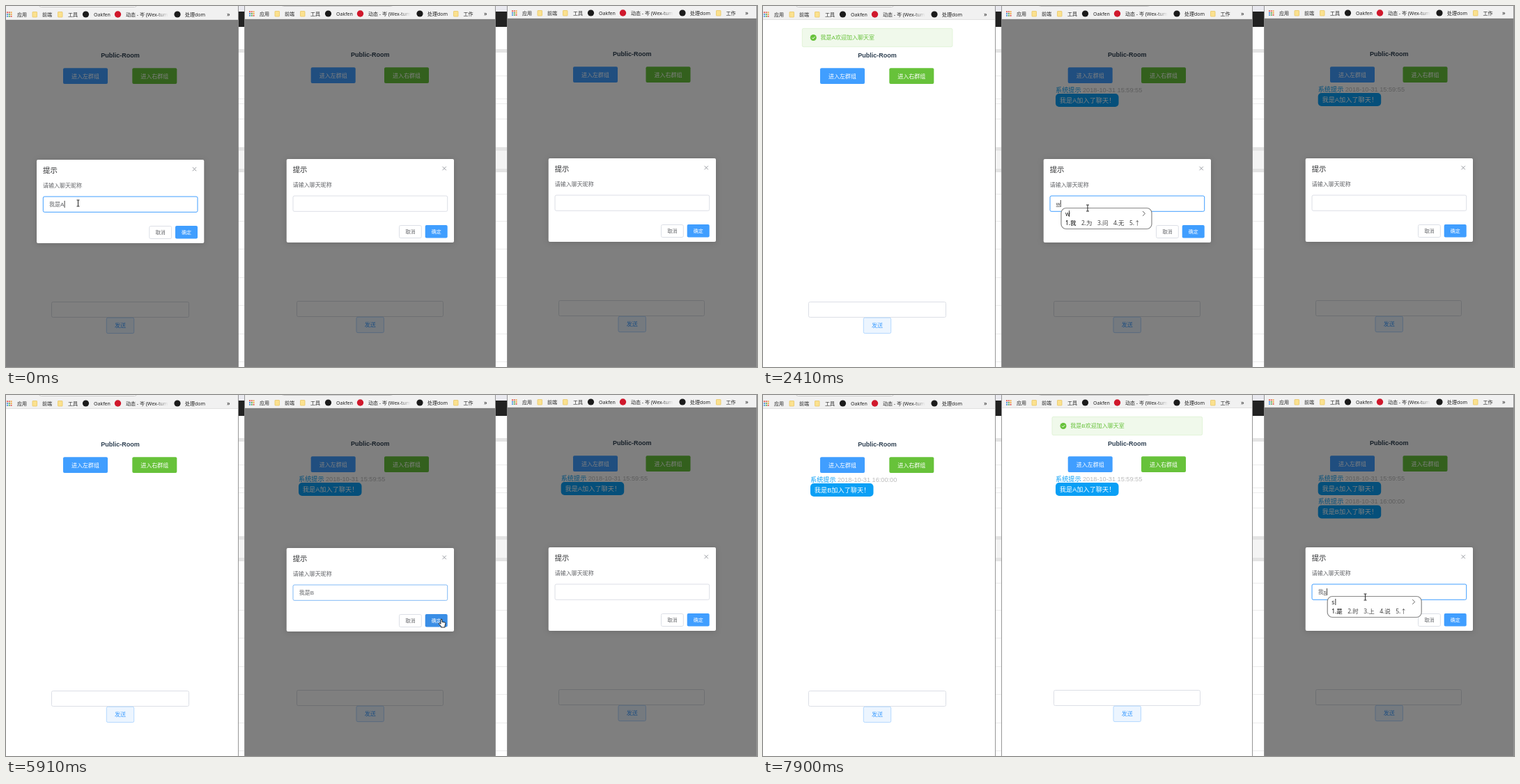
Write an HTML page that moves like this. It is 1078 px wide and 519 px high and loops after 8 s.

```html
<!DOCTYPE html>
<html lang="zh-CN">
<head>
<meta charset="utf-8">
<title>Group chat</title>
<style>
html, body { margin: 0; width: 100%; height: 100%; overflow: hidden; background: #fff; }
svg { display: block; width: 1078px; height: 519px; }
text { font-family: "Liberation Sans", "Noto Sans CJK SC", "Noto Sans CJK", sans-serif; white-space: pre; }
.bar text, .ime text { font-family: "Noto Sans", "Noto Sans CJK SC", "Noto Sans CJK", sans-serif; }
.box { filter: drop-shadow(0 1px 4px rgba(0, 0, 0, .15)); }
</style>
</head>
<body>
<svg id="stage" viewBox="0 0 1078 519" xmlns="http://www.w3.org/2000/svg"></svg>
<script>
const LOOP = 8000, BLUE = '#409eff', GREEN = '#67c23a', LINE = '#dcdfe6';
const stage = document.getElementById('stage');
const find = id => document.getElementById(id);

// Each window sits one pixel higher than the one before it.
const panels = [
  { x: 0, w: 333.5, cx: 164, buttons: [82, 181.3], send: [65.5, 197], msg: 68, bar: 0, more: 317, omni: 140,
    focus: [-500, 1180], caret: [[0, 370], [900, 1180]], close: 1236, toast: [1234, 3900], name: 'A' },
  { x: 342.5, w: 360, cx: 522.7, buttons: [437.7, 543], send: [417.5, 210], msg: 420, bar: 348, more: 686, omni: 160,
    focus: [1950, 5860], caret: [[1950, 5110], [5640, 5860]], close: 5911, toast: [5934, 1e5], name: 'B' },
  { x: 719.5, w: 358, cx: 898.7, buttons: [814, 918.5], send: [793.5, 209], msg: 796.7, bar: 725, more: 1061, omni: 0,
    focus: [6420, 1e5], caret: [[6420, 1e5]], close: 1e5, toast: [1e5, 2e5], name: 'C' }
];

const ONE = ['我', '为', '问', '无', '↑'], TWO = ['我是', '卧室', '我市', '我试', '↑'], SHI = ['是', '时', '上', '说', '↑'];
// [time, panel, committed text, composition, popup width, candidates]
const typing = [
  [0, 0, '我是A', '', 0],
  [0, 1, '', '', 0],
  [0, 2, '', '', 0],
  [2380, 1, '', 'w', 0],
  [2410, 1, '', 'w', 130, ONE],
  [2600, 1, '', 'ws', 159, TWO],
  [2800, 1, '', 'w', 130, ONE],
  [2960, 1, '', '', 0],
  [3250, 1, '', 'w', 130, ONE],
  [3360, 1, '', 'wi', 148, ONE],
  [3470, 1, '', '', 0],
  [3700, 1, '', 'w', 140, ONE, true],
  [3730, 1, '', 'w', 130, ONE],
  [3870, 1, '', 'wo', 130, ONE],
  [3960, 1, '', 'wos', 165, TWO],
  [4060, 1, '', 'wosh', 190, TWO],
  [4150, 1, '', 'woshi', 201, TWO],
  [4300, 1, '我是', '', 0],
  [4620, 1, '我是B', '', 0],
  [6960, 2, '', 'w', 130, ONE],
  [7370, 2, '', 'wo', 130, ONE],
  [7740, 2, '我', '', 0],
  [7900, 2, '我', 's', 135, SHI]
];

// [time, x, y] of the mouse
const mouse = [
  [0, 103.5, 283.5], [590, 103.5, 283.5], [1150, 258, 325], [1240, 260, 325], [1360, 287.5, 322.5],
  [1460, 287.5, 322.5], [2050, 466, 290.5], [5110, 466, 290.5], [5750, 618, 322], [5911, 625, 322],
  [6000, 807.5, 300], [6480, 864.5, 290.5], [LOOP, 864.5, 290.5]
];

const clamp = v => Math.max(0, Math.min(1, v));

// The standard CSS "ease" curve
function ease(p) {
  p = clamp(p);
  let lo = 0, hi = 1;
  for (let i = 0; i < 18; i++) {
    const u = (lo + hi) / 2, v = 1 - u;
    if (3 * v * v * u * .25 + 3 * v * u * u * .25 + u * u * u < p) lo = u; else hi = u;
  }
  return 3 * (1 - lo) ** 2 * lo * .1 + 3 * (1 - lo) * lo * lo + lo ** 3;
}

function mix(a, b, k) {
  return `rgb(${a.map((v, i) => Math.round(v + (b[i] - v) * k))})`;
}

const rect = (x, y, w, h, fill, extra = '') =>
  `<rect x="${x}" y="${y}" width="${w}" height="${h}" fill="${fill}" ${extra}/>`;
const text = (x, cy, size, fill, str, extra = '') =>
  `<text x="${x}" y="${cy + size * .37}" font-size="${size}" fill="${fill}" ${extra}>${str}</text>`;
const dot = (x, y, r, fill) => `<circle cx="${x}" cy="${y}" r="${r}" fill="${fill}"/>`;
const button = (x, y, w, h, size, fill, color, str, extra = '') =>
  rect(x, y, w, h, fill, `rx="2" ${extra}`) +
  text(x + w / 2, y + h / 2, size, color, str, 'text-anchor="middle" font-weight="500"');
const outline = color => `stroke="${color}"`;

function desktop() {
  const rows = [100, 133, 140, 162, 270, 309, 349, 390, 430, 471, 511];
  return rect(333, 0, 387, 519, '#fff') + rect(333, 0, 387, 8, '#e9e9ef') + rect(333, 8, 387, 22, '#222') +
    rect(333, 208, 387, 27, '#f4f4f4') +
    [62, 203, 234].map(y => rect(333, y, 387, 5, '#e4e4e4')).join('') +
    rows.map(y => rect(333, y, 387, 1, '#ececec')).join('');
}

function bookmarks(p, i) {
  const ink = '#222', folder = x => rect(x + .5, 8.5, 6.5, 7.5, '#fbe18f', 'rx=".5" stroke="#e9c766" stroke-width=".8"');
  const label = (x, s) => text(x, 12, 7, ink, s);
  const apps = ['#e2574c', '#e2574c', '#f0a33a', '#4a90e2', '#57a957', '#f0a33a', '#4a90e2', '#57a957', '#e2574c'];
  let s = rect(p.x, -4, p.w, 24, '#f1f1f1') + rect(p.x, 19.2, p.w, .8, '#dcdcdc');
  s += `<g transform="translate(${p.bar})">`;
  if (p.omni) s += rect(47.5, -12, p.omni, 13.5, '#fff', 'rx="3" stroke="#c8c8c8"');
  s += apps.map((c, k) => rect(1 + k % 3 * 2.8, 8.3 + Math.floor(k / 3) * 2.8, 1.9, 1.9, c)).join('');
  s += label(16, '应用') + folder(37.5) + label(52, '前端') + folder(74) + label(89, '工具');
  s += dot(114.5, 12, 4.6, '#1b1b1b') + label(126, 'Oakfen') + dot(160.5, 12, 4.7, '#d0182c');
  s += label(172, '动态 - 岑 (Wex-tum') + rect(216, 5, 17, 13, 'url(#fade)') + rect(233, 5, 8, 13, '#f1f1f1');
  s += dot(246, 12, 4.6, '#1b1b1b') + label(257, '处理dom');
  if (i) s += folder(294) + label(308.5, '工作');
  return s + '</g>' + text(p.more, 11.5, 9, ink, '»');
}

function message(id, x, y, name, time) {
  return `<g id="${id}">` + text(x, y, 9.2, '#0a9ff5', '系统提示') +
    text(x + 39, y, 9.2, '#bbb', '2018-10-31 ' + time) +
    rect(x, y + 5.8, 90.5, 19, '#0a9ff5', 'rx="5"') +
    text(x + 5.8, y + 15.4, 9.2, '#fff', `我是${name}加入了聊天！`) + '</g>';
}

function dialog(p, i) {
  const x = p.cx - 120, cx = x + 226.5;
  return `<g id="dialog${i}">` + rect(x, 221, 240.3, 120, '#fff', 'rx="2" class="box"') +
    text(x + 9, 235.7, 10.4, '#303133', '提示') +
    `<path d="M${cx - 2.7} 231.8l5.4 5.4m0 -5.4l-5.4 5.4" stroke="#909399" stroke-width=".9"/>` +
    text(x + 9, 258.2, 8, '#606266', '请输入聊天昵称') +
    rect(x + 9.3, 274, 221.7, 22.3, '#fff', `id="field${i}" rx="2"`) +
    `<text id="value${i}" x="${x + 18}" y="288" font-size="8" fill="#606266"><tspan></tspan><tspan fill="#444"></tspan></text>` +
    `<path id="under${i}" stroke="#555" stroke-width=".8"/>` + rect(0, 280, .9, 10, '#333', `id="caret${i}"`) +
    button(x + 161.8, 316.5, 31.8, 18, 7, '#fff', '#606266', '取消', outline(LINE)) +
    button(x + 199, 316, 32, 18.5, 7, BLUE, '#fff', '确定', `id="ok${i}"`) + '</g>';
}

function toast(p, i) {
  const x = p.cx - 107.7;
  return `<g id="toast${i}">` + rect(x, 32.3, 215.6, 26.4, '#f0f9eb', 'rx="2" stroke="#e1f3d8"') +
    dot(x + 16, 45.5, 4.5, GREEN) +
    `<path d="M${x + 14} 45.6l1.5 1.5l2.7 -2.9" fill="none" stroke="#fff" stroke-width="1"/>` +
    text(x + 26.3, 45.5, 8, GREEN, `我是${p.name}欢迎加入聊天室`) + '</g>';
}

function panel(p, i) {
  const [bx, bw] = p.send;
  let s = `<g transform="translate(0 ${-i})">` + rect(p.x, 19, p.w, 506, '#fff');
  s += text(p.cx, 71, 9, '#2c3e50', 'Public-Room', 'text-anchor="middle" font-weight="bold"');
  s += button(p.buttons[0], 89.3, 64, 22.7, 8, BLUE, '#fff', '进入左群组');
  s += button(p.buttons[1], 89.3, 64, 22.7, 8, GREEN, '#fff', '进入右群组');
  if (i) s += message('a' + i, p.msg, 121.2, 'A', '15:59:55');
  if (i !== 1) s += message('b' + i, p.msg, i ? 154.6 : 121.2, 'B', '16:00:00');
  s += rect(bx, 425.5, bw, 22, '#fff', 'rx="2" ' + outline(LINE));
  s += button(p.cx - 19.7, 448.2, 39.4, 22.4, 8, '#ecf5ff', BLUE, '发送', outline('#b3d8ff'));
  s += rect(p.x, 20, p.w, 505, '#000', `id="mask${i}"`) + dialog(p, i) + toast(p, i);
  s += `<g class="bar">${bookmarks(p, i)}</g></g>`;
  s += rect(p.x + p.w - .5, 0, .9, 519, '#8c8c8c');
  if (i) s += rect(p.x - .5, 0, .9, 519, '#8c8c8c');
  return s;
}

stage.innerHTML =
  '<defs><linearGradient id="fade"><stop stop-color="#f1f1f1" stop-opacity="0"/><stop offset="1" stop-color="#f1f1f1"/></linearGradient></defs>' +
  desktop() + panels.map(panel).join('') + '<g id="ime" class="ime"></g>' +
  '<g id="beam" fill="none"><path d="M-2 -4.5H2M0 -4.5V4.5M-2 4.5H2" stroke="#333" stroke-width="1.1"/></g>' +
  '<path id="arrow" d="M0 0V9.4L2.1 7.5L3.6 10.9L5.2 10.2L3.7 6.9H6.6Z" fill="#fff" stroke="#222" stroke-width=".8"/>' +
  '<path id="hand" d="M-1 .8Q0 -.6 1 .8V4.2L5 5Q6 5.3 5.9 6.5L5 10V12H-.5V10.6L-3.6 7.2Q-3.8 5.6 -2.4 6L-1 7.2Z" fill="#fff" stroke="#111" stroke-width=".9"/>';

const show = (el, on) => el.setAttribute('visibility', on ? 'visible' : 'hidden');

function setField(p, i, t) {
  const row = typing.filter(r => r[1] === i && r[0] <= t).pop();
  const value = find('value' + i), [done, comp] = value.children;
  if (done.textContent !== row[2]) done.textContent = row[2];
  if (comp.textContent !== row[3]) comp.textContent = row[3];
  const start = p.cx - 102, width = value.getComputedTextLength();
  const from = row[2] ? done.getComputedTextLength() : 0;
  const caret = start + width + .3;
  find('under' + i).setAttribute('d', row[3] ? `M${start + from} 289.4H${start + width}` : '');
  find('caret' + i).setAttribute('x', caret);
  show(find('caret' + i), p.caret.some(([a, b]) => t >= a && t < b));
  const [a, b] = p.focus;
  const lit = ease((t - a) / 150) - ease((t - b) / 200);
  find('field' + i).setAttribute('stroke', mix([220, 223, 230], [64, 158, 255], lit));
  return { row, caret };
}

let popupKey = null;
function setPopup(row, caret, i) {
  const ime = find('ime'), key = row ? row[0] : -1;
  if (key === popupKey) return;
  popupKey = key;
  if (!row) { ime.innerHTML = ''; return; }
  const [, , , comp, w, list, corner] = row;
  const x = corner ? 955.5 : caret + 1.2, y = corner ? 514 : 291.5 - i;
  const step = list === TWO ? (w - 28) / 4.2 : 23;
  ime.innerHTML = rect(x, y, w, 30, '#fff', 'rx="7" stroke="#888" stroke-width="1.2"') +
    text(x + 6, y + 8, 8.5, '#222', comp) +
    rect(x + 6.3 + comp.length * 4.9, y + 3.5, .9, 9, '#222') +
    `<path d="M${x + w - 13} ${y + 4.5}l3.5 3.4l-3.5 3.4" fill="none" stroke="#555" stroke-width=".9"/>` +
    list.map((c, k) => text(x + 6 + k * step, y + 21, 8.5, k ? '#444' : '#000', `${k + 1}.${c}`,
      k ? '' : 'font-weight="500"')).join('');
}

function setMouse(t) {
  const k = mouse.findIndex(m => m[0] > t), [t0, x0, y0] = mouse[k - 1], [t1, x1, y1] = mouse[k];
  let u = (t - t0) / (t1 - t0);
  u = u * u * (3 - 2 * u);
  const x = x0 + (x1 - x0) * u, y = y0 + (y1 - y0) * u;
  let kind = 'arrow';
  panels.forEach((p, i) => {
    const dx = x - p.cx + 120, dy = y + i, row = dy > 316 && dy < 335, open = t < p.close + 60;
    const overOk = open && row && dx > 199 && dx < 231;
    if (open && dx > 9 && dx < 231 && dy > 274 && dy < 297) kind = 'beam';
    if (overOk || open && row && dx > 162 && dx < 194) kind = 'hand';
    find('ok' + i).setAttribute('fill', !overOk ? BLUE : t > p.focus[1] ? '#3a8ee6' : '#66b1ff');
  });
  for (const id of ['beam', 'arrow', 'hand']) {
    show(find(id), id === kind);
    find(id).setAttribute('transform', `translate(${x} ${y})`);
  }
}

function draw(t) {
  let popup = null;
  panels.forEach((p, i) => {
    const field = setField(p, i, t);
    if (field.row[4]) popup = [field.row, field.caret, i];

    find('mask' + i).setAttribute('opacity', .5 * (1 - ease((t - p.close) / 200)));
    const gone = ease((t - p.close) / 300), box = find('dialog' + i);
    box.setAttribute('opacity', 1 - gone);
    box.setAttribute('transform', `translate(0 ${-10.7 * gone})`);
    box.setAttribute('display', gone < 1 ? 'inline' : 'none');

    const [a, b] = p.toast, note = find('toast' + i);
    const phase = d => ease((t - a) / d) - ease((t - b) / d);
    note.setAttribute('opacity', phase(300));
    note.setAttribute('transform', `translate(0 ${-27 * (1 - phase(400))})`);
  });
  setPopup(...(popup || [null]));
  for (const id of ['a1', 'a2']) show(find(id), t >= 1290);
  for (const id of ['b0', 'b2']) show(find(id), t >= 5950);
  setMouse(t);
}

const begin = performance.now();
function tick() {
  draw((performance.now() - begin) % LOOP);
  requestAnimationFrame(tick);
}
tick();
</script>
</body>
</html>
```
